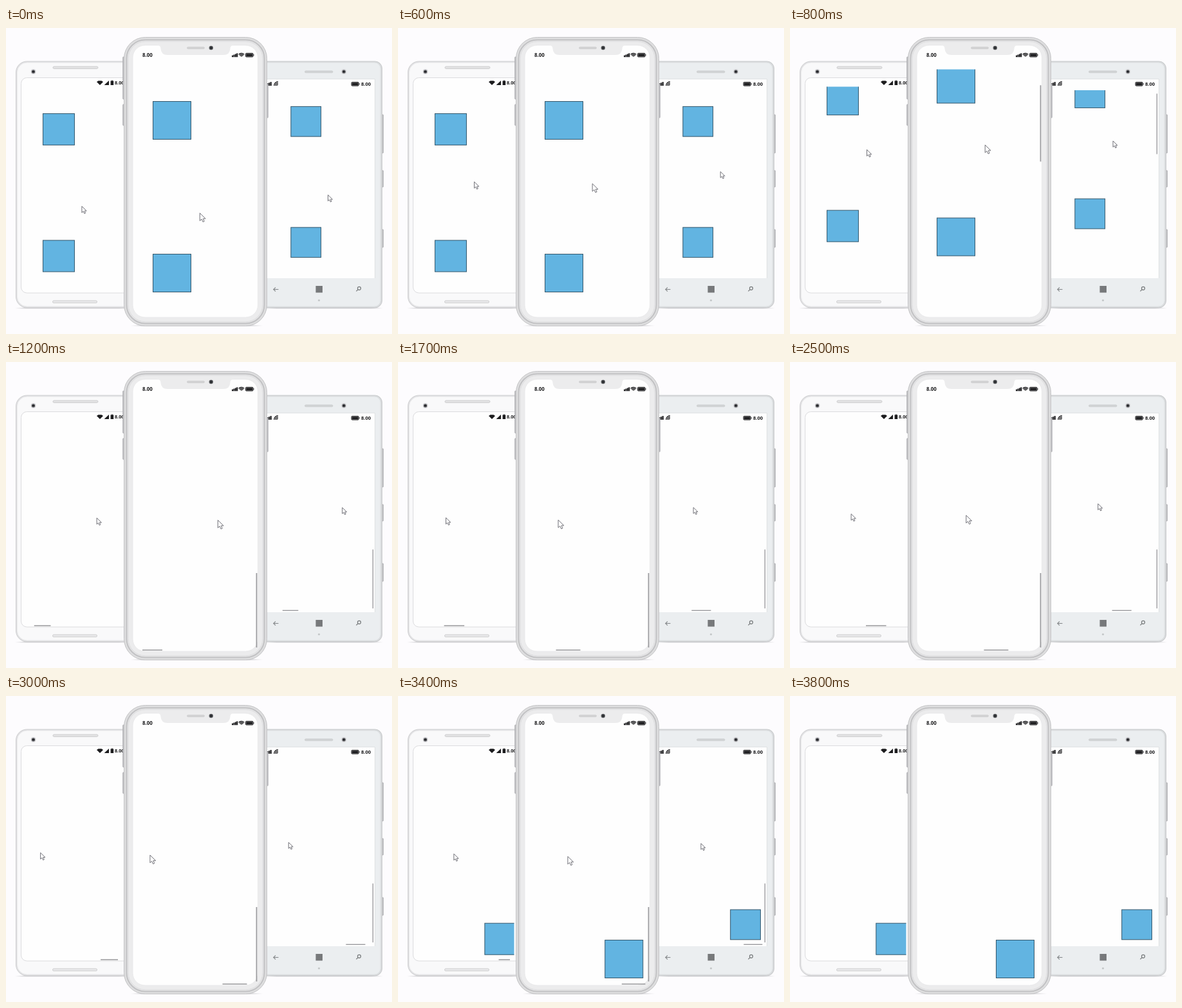
Write an HTML page with a canvas that moves like this. It is 600x477 px and loops after 4000 ms.

```html
<!DOCTYPE html>
<html lang="en">
<head>
<meta charset="utf-8">
<title>Diagram scrolling on three phones</title>
<style>
  html, body { margin: 0; width: 100%; height: 100%; overflow: hidden; background: #fdfcfe; }
  canvas { display: block; width: 600px; height: 477px; }
</style>
</head>
<body>
<canvas id="stage" width="600" height="477"></canvas>
<script>
const ctx = document.getElementById('stage').getContext('2d');
const LOOP = 4000, STEP = 100;
const INK = '#1c1c1e';

// Screen content is laid out once, in the middle phone's coordinates.
const views = {
  left:   { scale: 0.83,  dx: -132.2, dy: 38.4, clip: [24, 91.5, 156.5, 320.5], barEnd: 174 },
  right:  { scale: 0.792, dx: 261.9,  dy: 31.7, clip: [404, 97, 169, 292], barEnd: 573 },
  middle: { scale: 1,     dx: 0,      dy: 0,    clip: [197, 64.5, 194, 386], barEnd: 391 }
};

// Turning points of each gesture: time, then values; the moves between them are eased.
const pointerStops = [
  [400, 301, 288], [850, 303, 178], [1200, 329, 246], [1600, 221, 246], [1900, 328, 245],
  [2400, 225, 245], [2600, 322, 232], [2800, 214, 247], [3560, 270, 250]
];
const verticalStops = [[725, 72], [1200, 329]];
const horizontalStops = [[1200, 212], [1960, 258], [2600, 304.5], [3200, 347.7], [3700, 348]];

const clamp = u => Math.min(1, Math.max(0, u));
const smooth = u => u * u * (3 - 2 * u);

function glide(stops, t) {
  const next = Math.max(1, stops.findIndex(s => s[0] >= t));
  const last = t > stops[stops.length - 1][0] ? stops.length - 1 : next;
  const [t0, ...from] = stops[last - 1], [t1, ...to] = stops[last];
  const u = smooth(clamp((t - t0) / (t1 - t0)));
  return from.map((v, i) => v + (to[i] - v) * u);
}

function fillRect(color, x, y, w, h) {
  ctx.fillStyle = color;
  ctx.fillRect(x, y, w, h);
}

function rounded(x, y, w, h, r, fill, stroke, width = 1) {
  ctx.beginPath();
  ctx.roundRect(x, y, w, h, r);
  if (fill) { ctx.fillStyle = fill; ctx.fill(); }
  if (stroke) { ctx.strokeStyle = stroke; ctx.lineWidth = width; ctx.stroke(); }
}

function dot(x, y, r, color) {
  ctx.beginPath();
  ctx.arc(x, y, r, 0, Math.PI * 2);
  ctx.fillStyle = color;
  ctx.fill();
}

function line(color, width, ...p) {
  ctx.beginPath();
  for (let i = 0; i < p.length; i += 2) ctx.lineTo(p[i], p[i + 1]);
  ctx.strokeStyle = color;
  ctx.lineWidth = width;
  ctx.stroke();
}

function polygon(color, ...p) {
  ctx.beginPath();
  for (let i = 0; i < p.length; i += 2) ctx.lineTo(p[i], p[i + 1]);
  ctx.closePath();
  ctx.fillStyle = color;
  ctx.fill();
}

function clock(x, y, size) {
  ctx.font = `bold ${size}px "Open Sans", sans-serif`;
  ctx.fillStyle = INK;
  ctx.fillText('8.00', x, y);
}

function camera(x, y) {
  dot(x, y, 3.9, '#d0d0d3');
  dot(x, y, 2.6, '#4c4d51');
  dot(x, y, 1.2, '#1b1c20');
}

function battery(x, y, w, h) {
  rounded(x, y, w - 1.2, h, 1.2, '#77777a', INK, .9);
  fillRect(INK, x + 1.2, y + 1.2, w - 3.6, h - 2.4);
  fillRect(INK, x + w - .8, y + h / 2 - 1, 1, 2);
}

function signalBars(x, bottom) {
  for (let i = 0; i < 4; i++) {
    const h = 2.6 + i * 1.1;
    fillRect(INK, x + i * 2.4, bottom - h, 2.1, h);
  }
}

function waves(x, y, spacing, from, to) {
  for (let i = 1; i <= 3; i++) {
    ctx.beginPath();
    ctx.arc(x, y, i * spacing, from, to);
    ctx.strokeStyle = INK;
    ctx.lineWidth = 1.3;
    ctx.stroke();
  }
}

function sideButtons(x, ...spans) {
  for (const [y, h] of spans) rounded(x, y, 2.4, h, 1, '#c0c0c3', '#a9a9ac', .7);
}

function shadow(x, y, w) {
  const g = ctx.createLinearGradient(x, 0, x + w, 0);
  g.addColorStop(0, 'rgba(170,170,174,0)');
  g.addColorStop(.1, 'rgba(170,170,174,.6)');
  g.addColorStop(.9, 'rgba(170,170,174,.6)');
  g.addColorStop(1, 'rgba(170,170,174,0)');
  fillRect(g, x, y, w, 1.4);
}

function leftPhone() {
  shadow(14, 436, 180);
  rounded(15.5, 52, 200, 384, 17, '#e0e0e2', '#cfcfd1');
  rounded(17.5, 54, 200, 380, 15, '#f9f9fa', '#ebebed');
  rounded(23.5, 77.5, 200, 335.5, 9, '#fefefe', '#dcdcde');
  rounded(73, 60, 70, 3.4, 1.7, '#e4e4e5', '#c4c4c6', .8);
  rounded(72.5, 425, 69, 3.6, 1.8, '#e9e9ea', '#c4c4c6', .8);
  camera(42.5, 68);
  polygon(INK, 141, 84, 143.5, 82.2, 148.5, 82.2, 151, 84, 146, 89);
  polygon(INK, 152.7, 89, 160, 82, 160, 89);
  fillRect(INK, 162.6, 82.4, 4.6, 6.6);
  fillRect(INK, 164, 81.6, 1.8, 1);
  clock(169, 88.2, 7.2);
}

function rightPhone() {
  shadow(402, 436, 184);
  sideButtons(584.2, [135, 60], [222, 26], [314, 28]);
  rounded(380, 52, 204.5, 384, 11, '#d9dbdd', '#c6c8ca');
  rounded(380, 54, 202, 380, 9, '#ebeef0', '#e0e3e5');
  fillRect('#fefefe', 380, 80, 193, 310);
  line('#dfe2e3', 1, 380, 79.5, 573.5, 79.5, 573.5, 390);
  rounded(464.5, 66.8, 43.5, 3, 1.5, '#d1d3d4', '#c6c8c9', .6);
  camera(525.2, 68);
  signalBars(403.5, 90);
  waves(423, 90, 2.1, Math.PI, Math.PI * 1.5);
  battery(537, 84.4, 12.4, 5.8);
  clock(552, 90, 7.6);
  line('#85888a', 1.1, 423.5, 407.5, 415.8, 407.5);
  line('#85888a', 1.1, 419, 404.3, 415.8, 407.5, 419, 410.7);
  fillRect('#77797b', 481.5, 402, 10.5, 10.5);
  ctx.beginPath();
  ctx.arc(549, 405.8, 2.5, 0, Math.PI * 2);
  ctx.strokeStyle = '#777a7c';
  ctx.lineWidth = 1.2;
  ctx.stroke();
  line('#777a7c', 1.3, 547.2, 407.6, 544.4, 410.4);
  dot(486.5, 424.5, 1.6, '#c4c7c8');
}

function middlePhone() {
  shadow(194, 463.3, 205);
  sideButtons(181.6, [45, 38], [83, 28], [119, 33]);
  sideButtons(405, [87, 53]);
  rounded(183.5, 14.5, 222, 450, 33, '#dededf', '#c3c3c5');
  rounded(187.5, 18.5, 214, 442, 29, '#e9e9ea', '#c2c2c4', 2);
  rounded(190, 21, 209, 437, 26.5, '#ececed', '#dcdcde');
  rounded(197, 27, 194.5, 424, 19, '#fefefe', '#e6e6e7', .7);

  ctx.beginPath();
  ctx.moveTo(234, 26);
  ctx.quadraticCurveTo(240.5, 27, 240.5, 32);
  ctx.quadraticCurveTo(241, 42, 251, 42);
  ctx.lineTo(338, 42);
  ctx.quadraticCurveTo(348, 42, 348.5, 32);
  ctx.quadraticCurveTo(348.5, 27, 355, 26);
  ctx.fillStyle = '#ececed';
  ctx.fill();
  rounded(281.5, 29.7, 27, 2.8, 1.4, '#d3d3d4', '#c8c8ca', .6);
  dot(318.8, 31, 3.3, '#77797c');
  dot(318.8, 31, 2.4, '#303236');

  clock(212, 45, 7.9);
  signalBars(351, 45.3);
  waves(366, 45.5, 2, Math.PI * 1.24, Math.PI * 1.76);
  battery(372.5, 39.3, 12.8, 5.8);
}

function block(x, y, lineWidth) {
  ctx.fillStyle = '#62b4e1';
  ctx.strokeStyle = '#34566a';
  ctx.lineWidth = lineWidth;
  ctx.fillRect(x + .5, y + .5, 59, 59);
  ctx.strokeRect(x + .5, y + .5, 59, 59);
}

function pointer(x, y, lineWidth) {
  ctx.save();
  ctx.translate(x + .3, y + .5);
  polygon('#fefefe', 0, 0, 0, 12, 2.8, 9.5, 4.8, 13.8, 6.9, 12.8, 5, 8.7, 8.8, 8.7);
  ctx.strokeStyle = '#717178';
  ctx.lineWidth = lineWidth;
  ctx.stroke();
  ctx.restore();
}

function content(view, t) {
  const [top] = glide(verticalStops, t);
  const [start] = glide(horizontalStops, t);
  const scroll = (top - 72) * 3.28;
  const pixel = 1 / view.scale;

  ctx.save();
  ctx.beginPath();
  ctx.rect(...view.clip);
  ctx.clip();
  ctx.translate(view.dx, view.dy);
  ctx.scale(view.scale, view.scale);

  block(228, 114 - scroll, pixel);
  block(228, 352 - scroll, pixel);
  if (t >= 2600) block(320 + (348 - start) * 6.5, 380, pixel);

  ctx.globalAlpha = clamp((3800 - t) / 400);
  if (top > 72) line('#98989b', 1.7, 389.5, top, 389.5, Math.min(top + 119, 445));
  if (t >= 1100) {
    const length = 31 + 7 * clamp((t - 1200) / 200);
    const end = Math.min(start + length, 384.5, (view.barEnd - view.dx) / view.scale);
    line('#98989b', 1.7, start, 449, end, 449);
  }
  ctx.globalAlpha = 1;
  if (t < 3800) pointer(...glide(pointerStops, t), pixel);
  ctx.restore();
}

function draw(now) {
  const t = Math.floor((now % LOOP) / STEP) * STEP;
  fillRect('#fdfcfe', 0, 0, 600, 477);
  leftPhone();
  content(views.left, t);
  rightPhone();
  content(views.right, t);
  middlePhone();
  content(views.middle, t);
}

let origin;
function tick(now) {
  origin ??= now;
  draw(now - origin);
  requestAnimationFrame(tick);
}
draw(0);
requestAnimationFrame(tick);
</script>
</body>
</html>
```
